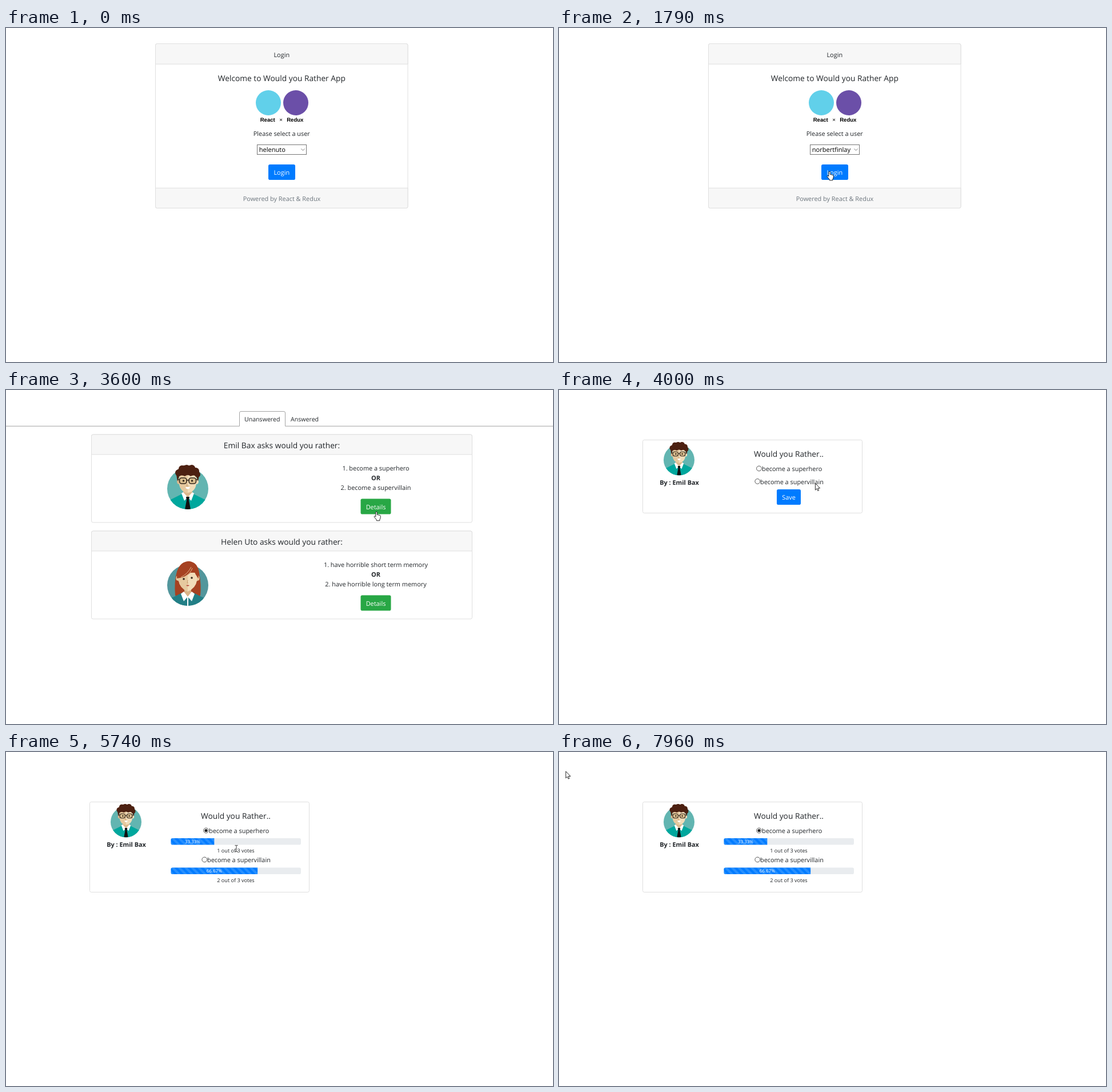
An HTML page that plays this animation: 957 by 585 pixels, repeating every 8 s.

```html
<!DOCTYPE html>
<html lang="en">
<head>
<meta charset="utf-8">
<title>Would you Rather</title>
<style>
  html, body { margin: 0; width: 957px; height: 585px; overflow: hidden; background: #fff; }
  svg { display: block; }
  text { font: 10.9px "Open Sans", "Noto Sans", sans-serif; fill: #212529; text-anchor: middle; text-rendering: geometricPrecision; }
  .left { text-anchor: start; }
  .h { font-size: 13.75px; }
  .b { font-weight: 700; }
  .sm { font-size: 9.1px; }
  .pct { font-size: 8px; }
  .tab { font-size: 10.6px; }
  .opt { font-size: 11.1px; fill: #000; }
  .logo { font: 700 9.6px "Liberation Sans", Arial, sans-serif; fill: #000; }
  .muted { fill: #6c757d; }
  .white { fill: #fff; }
  .card { fill: none; stroke: #dfdfdf; }
  .cap { fill: #f7f7f7; stroke: #dfdfdf; }
  .blue { fill: #007bff; }
  .over { fill: #0069d9; }
  .green { fill: #28a745; }
  .box { fill: #fff; stroke: #767676; }
  .radio { fill: #fff; stroke: #555; }
  .off { display: none; }
</style>
</head>
<body>
<svg width="957" height="585" viewBox="0 0 957 585">
  <defs>
    <clipPath id="disc"><circle r="36"/></clipPath>
    <pattern id="stripes" width="11.4" height="11.4" y="151" x="288.5" patternUnits="userSpaceOnUse">
      <path d="M0 5.7V11.4H5.7ZM0 0H5.7L11.4 5.7V11.4Z" fill="#fff" fill-opacity=".15"/>
    </pattern>

    <g id="man">
      <circle r="36" fill="#62b5b1"/>
      <g clip-path="url(#disc)">
        <path d="M-36 36V22Q-24 16-10 9H10Q24 16 36 22V36Z" fill="#00a79d"/>
        <path d="M-8 4H8V10L0 18L-8 10Z" fill="#dcb98e"/>
        <path d="M-8 6L0 15L-6 21L-11 8ZM8 6L0 15L6 21L11 8Z" fill="#fff"/>
        <path d="M-3 14H3L2 20L5 36H-5L-2 20Z" fill="#111"/>
      </g>
      <ellipse cx="-16" cy="-13" rx="3" ry="5" fill="#dcb98e"/>
      <ellipse cx="16" cy="-13" rx="3" ry="5" fill="#f1dcb9"/>
      <path d="M-15-28H15V-10Q14 5 0 7Q-14 5-15-10Z" fill="#f1dcb9"/>
      <path d="M-15-28H0V7Q-14 5-15-10Z" fill="#e6c99f"/>
      <path d="M-18-13L-20-25Q-21-33-14-36Q-8-43 0-40Q9-43 14-36Q22-32 20-24L18-13L15-22Q10-25 5-22Q0-26-5-22Q-11-25-15-22Z" fill="#4c2011"/>
      <g fill="#4c2011">
        <circle cx="-16" cy="-28" r="6"/><circle cx="-10" cy="-35" r="6"/><circle cx="-2" cy="-36" r="6"/>
        <circle cx="7" cy="-36" r="6"/><circle cx="14" cy="-31" r="6"/><circle cx="17" cy="-25" r="5"/>
      </g>
      <g fill="#d9bd8e" stroke="#33261b" stroke-width="1.6">
        <rect x="-14.5" y="-19" width="12.5" height="10" rx="4"/><rect x="2" y="-19" width="12.5" height="10" rx="4"/>
        <path d="M-2-15H2M-18-16H-14M14-16H18"/>
      </g>
      <circle cx="-7.5" cy="-14" r="1.7" fill="#33261b"/><circle cx="7.5" cy="-14" r="1.7" fill="#33261b"/>
      <path d="M-1-8L-2-5H2" fill="none" stroke="#c89c6c"/>
      <path d="M-4-3H4Q3 .5 0 .5Q-3 .5-4-3Z" fill="#fff"/>
    </g>

    <g id="woman">
      <circle r="36" fill="#52969c"/>
      <path d="M-22 18Q-24-8-19-24Q-13-42 2-42Q17-41 20-22Q24 0 22 18Q12 24 0 24Q-14 24-22 18Z" fill="#a64222"/>
      <g clip-path="url(#disc)">
        <path d="M-36 36V25Q-22 20-10 13H10Q22 20 36 25V36Z" fill="#227f86"/>
        <path d="M-6 4H6V14L0 21L-6 14Z" fill="#d9b388"/>
        <path d="M-7 11L0 20L-7 28L-12 15ZM7 11L0 20L7 28L12 15Z" fill="#fff"/>
        <path d="M-1 20H1V36H-1Z" fill="#fff"/>
      </g>
      <path d="M-17-18Q-22-16-20-9L-15-7ZM17-18Q22-16 20-9L15-7Z" fill="#e6c99f"/>
      <path d="M-16-22H16V-8Q14 5 0 11Q-14 5-16-8Z" fill="#f1dcb9"/>
      <path d="M-16-22H0V11Q-14 5-16-8Z" fill="#e6c99f"/>
      <path d="M-19-12Q-21-36 2-42Q18-38 19-12Q13-18 10-28Q0-14-19-12Z" fill="#a64222"/>
      <path d="M-12-14Q0-20 6-32M-4-16Q5-21 8-30" fill="none" stroke="#e2b58a"/>
      <circle cx="-7" cy="-11" r="1.8" fill="#33261b"/><circle cx="7" cy="-13" r="1.8" fill="#33261b"/>
      <path d="M0-9L-1-4H1" fill="none" stroke="#c89c6c"/>
      <path d="M-3 0Q0-1 3 0Q0 3-3 0Z" fill="#b8473c"/>
    </g>
  </defs>

  <g id="login">
    <rect class="card" x="261.5" y="27.5" width="441.5" height="288" rx="2.8"/>
    <path class="cap" d="M261.5 63.2V30.5Q261.5 27.5 264.5 27.5H700Q703 27.5 703 30.5V63.2ZM261.5 280.3V312.5Q261.5 315.5 264.5 315.5H700Q703 315.5 703 312.5V280.3Z"/>
    <text x="482.3" y="50.7">Login</text>
    <text class="h" x="482.3" y="92.7">Welcome to Would you Rather App</text>
    <circle cx="459" cy="131" r="22" fill="#61d0ea"/>
    <circle cx="507" cy="131" r="22" fill="#6b4fa8"/>
    <text class="logo" x="457.7" y="163.5">React</text>
    <text class="logo" x="481" y="163.5" style="font-weight:400">×</text>
    <text class="logo" x="505.8" y="163.5">Redux</text>
    <text x="482.3" y="188.8">Please select a user</text>
    <rect class="box" x="439.5" y="204.5" width="86" height="17"/>
    <text class="left opt" id="user" x="442.7" y="217.2"></text>
    <path d="M516.5 211.5L519.5 214.5L522.5 211.5" fill="none" stroke="#777"/>
    <rect id="loginBtn" x="459" y="239" width="47" height="27" rx="2.8"/>
    <text class="white" x="482.3" y="257.2">Login</text>
    <text class="muted" x="482.5" y="302.8">Powered by React &amp; Redux</text>
    <g id="menu">
      <path d="M443 287H526V226H530V291H443Z" fill-opacity=".15"/>
      <rect x="439.5" y="222.5" width="86" height="64" fill="#fff" stroke="#aaa"/>
      <rect id="mark" x="440" width="85" height="21" fill="#0078d7"/>
      <g id="options"></g>
    </g>
  </g>

  <g id="list">
    <path d="M0 63.3H408.5V40Q408.5 37.5 411 37.5H486Q488.5 37.5 488.5 40V63.3H957" fill="none" stroke="#a3a3a3"/>
    <text class="tab" x="448.2" y="55.3">Unanswered</text>
    <text class="tab" x="522.6" y="55.3">Answered</text>
    <g id="cards"></g>
  </g>

  <g id="poll">
    <rect class="card" id="pollCard" x="146.5" y="87.5" width="384" rx="2.8"/>
    <use href="#man" transform="translate(210 122.5) scale(.75)"/>
    <text class="b" x="210.5" y="165.8">By : Emil Bax</text>
    <text class="h" x="402" y="117.4">Would you Rather..</text>
    <circle class="radio" cx="350" cy="137.5" r="4.4"/>
    <circle id="dot" cx="350" cy="137.5" r="2.6" fill="#222"/>
    <text class="left" x="355" y="141.8">become a superhero</text>
    <g id="second">
      <circle class="radio" cx="347.3" cy="160" r="4.4"/>
      <text class="left" x="352" y="164.5">become a supervillain</text>
    </g>
    <g id="save">
      <rect id="ring" x="379" y="172" width="46" height="31" rx="4.5" fill="#80bdff"/>
      <rect id="saveBtn" x="381" y="174" width="42" height="27" rx="2.8"/>
      <text class="white" x="402" y="192">Save</text>
    </g>
    <g id="votes"></g>
  </g>

  <circle id="press" r="8.7" fill="#ff0" fill-opacity=".45"/>
  <g id="cursor" stroke-linejoin="round">
    <path id="arrow" d="M.4.4V12.2L3 9.7L4.8 13.6L6.6 12.8L4.9 9H8.6Z" fill="#fff" stroke="#111" stroke-width=".9"/>
    <path id="hand" d="M-1.2 1.4Q-1.2.2 0 .2Q1.3.2 1.3 1.4V5.4L5.8 6.4Q7.4 6.8 7.3 8.4L6.9 11.8L5.8 14V15.8H.2V14.2L-3.6 9.6Q-4.2 8.2-3.1 7.8Q-2.3 7.6-1.2 9Z" fill="#fff" stroke="#111" stroke-width=".9"/>
    <path id="beam" d="M-2.5-5.5H-.8L0-4.8L.8-5.5H2.5M0-4.8V4.8M-2.5 5.5H-.8L0 4.8L.8 5.5H2.5" fill="none" stroke="#222" stroke-width=".9"/>
  </g>
</svg>
<script>
const $ = id => document.getElementById(id);
const show = (id, on) => $(id).classList.toggle('off', !on);
const LOOP = 8000, START = 190, TICK = 79.2;
const users = ['helenuto', 'norbertfinlay', 'emilbax'];

const card = (y, who, art, a, b) => `<g transform="translate(0 ${y})">
  <rect class="card" x="149.5" y="78" width="666" height="154" rx="2.8"/>
  <path class="cap" d="M149.5 113V81Q149.5 78 152.5 78H812.5Q815.5 78 815.5 81V113Z"/>
  <text class="h" x="482.5" y="101.7">${who} asks would you rather:</text>
  <use href="#${art}" x="318" y="173"/>
  <text x="647" y="141.2">1. ${a}</text>
  <text class="b" x="647" y="158.3">OR</text>
  <text x="647" y="175.4">2. ${b}</text>
  <rect class="green" x="620.5" y="190.5" width="53" height="27" rx="2.8"/>
  <text class="white" x="647" y="208.7">Details</text></g>`;

const bar = (y, n) => {
  const w = 227.5 * n / 3;
  const fill = `M${288.5 + w} 151H291.3Q288.5 151 288.5 153.8V159.7Q288.5 162.5 291.3 162.5H${288.5 + w}Z`;
  return `<g transform="translate(0 ${y})">
  <rect x="288.5" y="151" width="227.5" height="11.5" rx="2.8" fill="#e9ecef"/>
  <path class="blue" d="${fill}"/><path d="${fill}" fill="url(#stripes)"/>
  <text class="pct white" x="${288.5 + w / 2}" y="159.8">${(n / 3 * 100).toFixed(2)}%</text>
  <text class="sm" x="402" y="176.2">${n} out of 3 votes</text></g>`;
};

$('cards').innerHTML =
  card(0, 'Emil Bax', 'man', 'become a superhero', 'become a supervillain') +
  card(169, 'Helen Uto', 'woman', 'have horrible short term memory', 'have horrible long term memory');
$('votes').innerHTML = bar(0, 1) + bar(51.5, 2);
$('options').innerHTML = users.map((u, i) =>
  `<text class="left opt" x="442.7" y="${237.3 + i * 21.3}">${u}</text>`).join('');

// Pointer path: tick, x, y, shape
const path = [
  [0, 878, 572, 'arrow'], [2, 716, 412, 'arrow'], [4, 560, 268, 'arrow'], [6, 508, 213, 'arrow'],
  [9, 506, 214, 'arrow'], [12, 478, 249, 'arrow'], [14, 477, 250, 'arrow'], [18, 474, 251, 'arrow'],
  [20, 473, 251, 'hand'], [24, 476, 256, 'hand'], [26, 476, 258, 'beam'], [30, 476, 258, 'beam'],
  [33, 461, 273, 'beam'], [34, 480, 270, 'arrow'], [39, 692, 222, 'arrow'], [41, 650, 212, 'hand'],
  [43, 648, 213, 'hand'], [46, 640, 211, 'arrow'], [49, 352, 139, 'arrow'], [51, 350, 138, 'arrow'],
  [52, 432, 202, 'arrow'], [53, 428, 201, 'arrow'], [55, 400, 190, 'hand'], [56, 397.5, 188, 'hand'],
  [61, 397.5, 188, 'arrow'], [64, 402, 180, 'beam'], [70, 403, 169, 'beam'], [71, 362, 182, 'arrow'],
  [75, 300, 166, 'arrow'], [79, 182, 92, 'arrow'], [82, 122, 36, 'arrow'], [83, 104, 56, 'arrow'],
  [85, 300, 64, 'arrow'], [88, 859, 42, 'arrow'], [91, 560, 14, 'arrow'], [93, 252, 9, 'arrow'],
  [94, 252, 9, ''], [96, 130, 19, 'arrow'], [97, 68, 36, 'arrow'], [98, 11.5, 33.5, 'arrow']
];
const clicks = [[8, 10], [17, 19], [23, 25], [44, 46], [50, 52], [56, 58]];

function pointer(k) {
  const i = path.findLastIndex(p => p[0] <= k);
  if (i < 0) return { x: 0, y: 0, shape: '' };
  const a = path[i], b = path[i + 1] || a;
  const f = b === a ? 0 : (k - a[0]) / (b[0] - a[0]);
  return { x: a[1] + (b[1] - a[1]) * f, y: a[2] + (b[2] - a[2]) * f, shape: a[3] };
}

function draw(k) {
  const p = pointer(k), voted = k >= 61;
  show('login', k < 25);
  show('list', k >= 25 && k < 46);
  show('poll', k >= 46);

  $('user').textContent = users[k < 19 ? 0 : 1];
  $('loginBtn').setAttribute('class', k > 20 ? 'over' : 'blue');
  const row = k < 11 ? 0 : 1;
  show('menu', k >= 9 && k < 19);
  $('mark').setAttribute('y', 223 + row * 21.3);
  [...$('options').children].forEach((t, i) => t.style.fill = i === row ? '#fff' : '#000');

  $('pollCard').setAttribute('height', voted ? 158 : 128);
  $('second').setAttribute('transform', `translate(0 ${voted ? 28.5 : 0})`);
  $('saveBtn').setAttribute('class', k > 54 ? 'over' : 'blue');
  show('dot', k >= 51);
  show('save', !voted);
  show('ring', k >= 58);
  show('votes', voted);

  const at = `translate(${p.x} ${p.y})`;
  $('press').setAttribute('transform', at);
  $('cursor').setAttribute('transform', at);
  show('press', clicks.some(([a, b]) => k >= a && k < b));
  for (const s of ['arrow', 'hand', 'beam']) show(s, s === p.shape);
}

let last;
function loop() {
  const k = Math.floor((performance.now() % LOOP - START) / TICK);
  if (k !== last) draw(last = k);
  requestAnimationFrame(loop);
}
loop();
</script>
</body>
</html>
```
